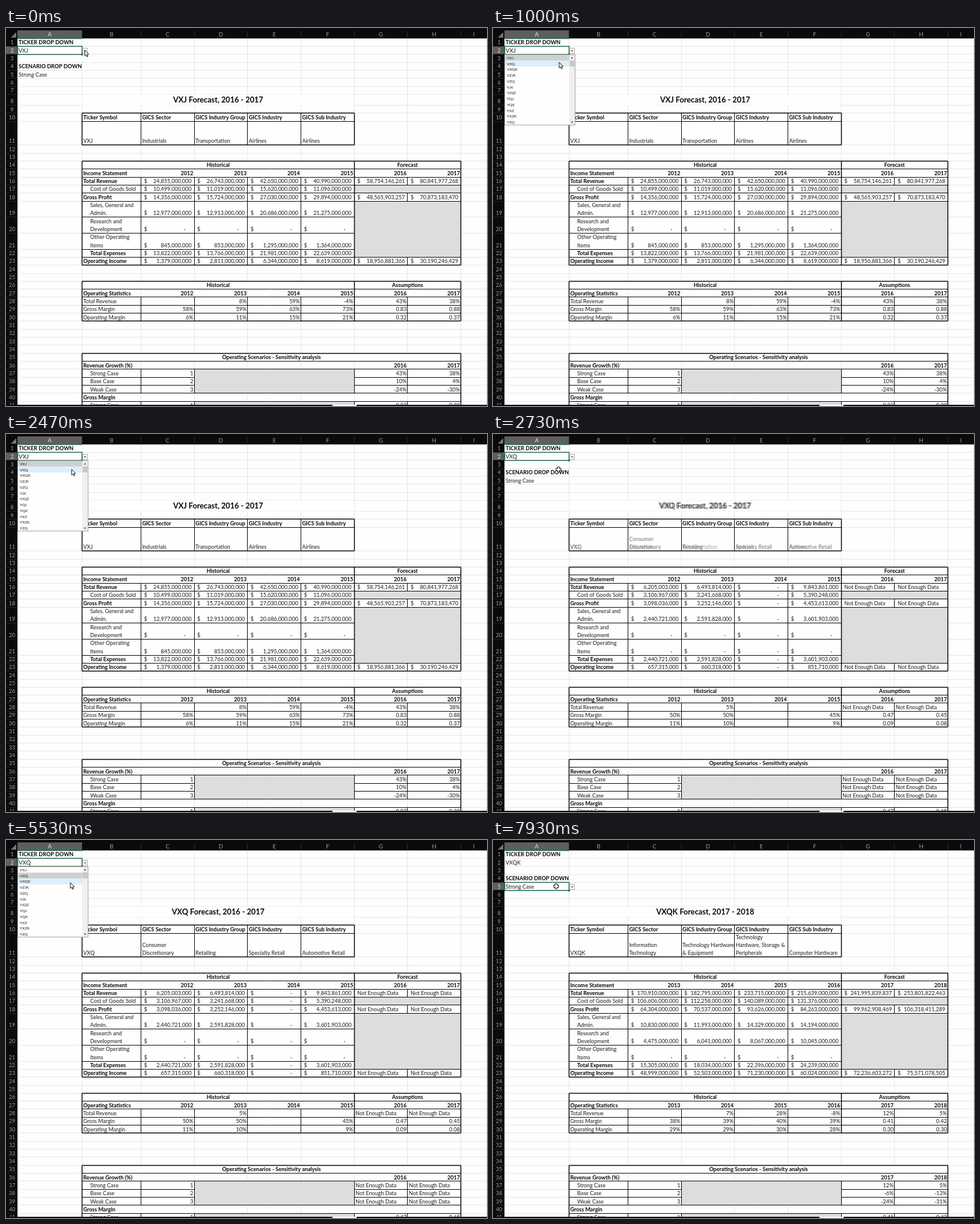
Recreate the animation shown at these times as an HTML page with a canvas. Size 800 by 629 pixels, loop 8000 ms.

```html
<!DOCTYPE html>
<html lang="en">
<head>
<meta charset="utf-8">
<title>Forecast sheet</title>
<style>
html, body { margin: 0; width: 100%; height: 100%; overflow: hidden; background: #fefeff; }
canvas { display: block; }
</style>
</head>
<body>
<canvas id="stage" width="800" height="629"></canvas>
<script>
const ctx = document.getElementById('stage').getContext('2d');
const LOOP = 8000, FADE = 150;
const PAPER = '#fefeff', SHADE = '#dddddd', GRID = '#e6e6ea', INK = '#080808', SOFT = '#1c1c1c';
const DARK = '#0a0a0a', LIT = '#5e5e5e', GREEN = '#236b47';

// Column edges A..I, and row edges where rowY[n] is the bottom of row n.
const LINE = 13.33;
const [A, B, C, D, E, F, G, H, I] = Array.from({ length: 9 }, (_, i) => i);
const colX = [19, 126.5, ...Array.from({ length: 7 }, (_, i) => 224.4 + 88.7 * i), 799.5];
const rowY = [17.3];
const rowLines = { 8: 1.35, 11: 2.96, 19: 2, 20: 2, 21: 2 };
for (let r = 1; r <= 41; r++) rowY[r] = rowY[r - 1] + LINE * (rowLines[r] || 1);
const lineY = (row, up = 0) => rowY[row] - 6.6 - up * LINE;

const tickers = 'VXJ VXQ VXQK VZJK VZQ YJX YJQZ YQJ YQX YXZ YXZK YZQ'.split(' ');

// Reported figures in millions, four years each; every other figure is derived.
const companies = [
  {
    year: 2012, sector: ['Industrials', 'Transportation', 'Airlines', 'Airlines'],
    revenue: [24855, 26743, 42650, 40990], goods: [10499, 11019, 15620, 11096],
    admin: [12977, 12913, 20686, 21275], research: [0, 0, 0, 0], other: [845, 853, 1295, 1364]
  },
  {
    year: 2012, sector: ['Consumer|Discretionary', 'Retailing', 'Specialty Retail', 'Automotive Retail'],
    revenue: [6205.003, 6493.814, 0, 9843.861], goods: [3106.967, 3241.668, 0, 5390.248],
    admin: [2440.721, 2591.828, 0, 3601.903], research: [0, 0, 0, 0], other: [0, 0, 0, 0]
  },
  {
    year: 2013, sector: ['Information|Technology', 'Technology Hardware|& Equipment', 'Technology|Hardware, Storage &|Peripherals', 'Computer Hardware'],
    revenue: [170910, 182795, 233715, 215639], goods: [106606, 112258, 140089, 131376],
    admin: [10830, 11993, 14329, 14194], research: [4475, 6041, 8067, 10045], other: [0, 0, 0, 0]
  }
];

// Linear trend for the next two years, shifted by `sign` standard deviations.
function project(values, sign = 1) {
  const points = values.map((y, x) => [x, y]).filter(p => isFinite(p[1]));
  const mean = i => points.reduce((sum, p) => sum + p[i], 0) / points.length;
  const mx = mean(0), my = mean(1);
  const spread = (i, j) => points.reduce((sum, p) => sum + (p[i] - [mx, my][i]) * (p[j] - [mx, my][j]), 0);
  const slope = spread(0, 1) / spread(0, 0), deviation = Math.sqrt(spread(1, 1) / (points.length - 1));
  return [0, 1].map(k => my + slope * (values.length + k - mx) + sign * deviation);
}

function analyse(co) {
  const { revenue, goods, admin, research, other } = co;
  const gross = revenue.map((v, i) => v - goods[i]);
  const expenses = admin.map((v, i) => v + research[i] + other[i]);
  const income = gross.map((v, i) => v - admin[i] - research[i]);
  const growth = revenue.slice(1).map((v, i) => v && revenue[i] ? v / revenue[i] - 1 : NaN);
  const grossMargin = gross.map((v, i) => v / revenue[i]);
  const incomeMargin = income.map((v, i) => v / revenue[i]);
  const cases = [1, 0, -1].map(sign => project(growth, sign));
  const [first, second] = cases[0];
  const sales = [revenue[3] * (1 + first), revenue[3] * (1 + first) * (1 + second)];
  const [grossNext, incomeNext] = [project(grossMargin), project(incomeMargin)];
  const share = rates => sales.map((v, i) => v * rates[i]);
  return {
    history: [revenue, goods, gross, admin, research, other, expenses, income],
    forecast: { 16: sales, 18: share(grossNext), 23: share(incomeNext) },
    growth, grossMargin, incomeMargin, cases, grossNext, incomeNext
  };
}
const results = companies.map(analyse);

function text(str, x, y, { align = 'left', bold = false, size = 9, color = bold ? INK : SOFT } = {}) {
  ctx.font = `${bold ? 'bold ' : ''}${size}px Lato, sans-serif`;
  ctx.textAlign = align;
  ctx.fillStyle = color;
  ctx.fillText(str, x, y + size * 0.36);
}
function rect(x, y, w, h, fill) {
  ctx.fillStyle = fill;
  ctx.fillRect(x, y, w, h);
}
function box(x, y, w, h, color, width = 1) {
  ctx.strokeStyle = color;
  ctx.lineWidth = width;
  ctx.strokeRect(x, y, w, h);
}
function line(x1, y1, x2, y2, width = 1, color = INK) {
  const snap = v => Math.floor(v) + 0.5;
  ctx.strokeStyle = color;
  ctx.lineWidth = width;
  ctx.beginPath();
  ctx.moveTo(snap(x1), snap(y1));
  ctx.lineTo(snap(x2), snap(y2));
  ctx.stroke();
}

// Block helpers take inclusive columns and rows.
const fillCells = (c1, r1, c2, r2, color) =>
  rect(colX[c1], rowY[r1 - 1], colX[c2 + 1] - colX[c1], rowY[r2] - rowY[r1 - 1], color);
const under = (row, c1, c2, width) => line(colX[c1], rowY[row], colX[c2 + 1], rowY[row], width);
const leftOf = (col, r1, r2, width) => line(colX[col], rowY[r1 - 1], colX[col], rowY[r2], width);
function frame(c1, r1, c2, r2) {
  under(r1 - 1, c1, c2, 1.5);
  under(r2, c1, c2, 1.5);
  leftOf(c1, r1, r2, 1.5);
  leftOf(c2 + 1, r1, r2, 1.5);
}

function label(str, col, row, bold, indent = 2) {
  const lines = str.split('|');
  lines.forEach((s, i) => text(s, colX[col] + indent, lineY(row, lines.length - 1 - i), { bold }));
}
const right = (str, col, row, bold, gap = 1.7) => text(str, colX[col + 1] - gap, lineY(row), { align: 'right', bold });
const centre = (str, c1, c2, row) => text(str, (colX[c1] + colX[c2 + 1]) / 2, lineY(row), { align: 'center', bold: true });
const noData = (col, row, indent) => label('Not Enough Data', col, row, false, indent);

function money(millions, col, row) {
  if (isNaN(millions)) return noData(col, row, 5);
  label('$', col, row, false, 5);
  if (millions) right(Math.round(millions * 1e6).toLocaleString('en-US'), col, row, false, 4.5);
  else right('-', col, row, false, 14.5);
}
const percent = v => Math.round(v * 100) + '%';
const decimal = v => v.toFixed(2);
const past = (values, col, row) => values.forEach((v, i) => isNaN(v) || right(percent(v), col + i, row));
const future = (values, row, format) =>
  values.forEach((v, i) => isNaN(v) ? noData(G + i, row) : right(format(v), G + i, row));

function drawGrid() {
  rect(0, 0, 800, 629, PAPER);
  colX.forEach(x => line(x, 17, x, 629, 1, GRID));
  rowY.forEach(y => line(19, y, 800, y, 1, GRID));
  [[B, 8, F, 8], [B, 14, F, 14], [G, 14, H, 14], [B, 26, F, 26], [G, 26, H, 26], [B, 35, H, 35]]
    .forEach(block => fillCells(...block, PAPER));
  [[G, 17, H, 17], [G, 19, H, 22], [D, 37, F, 39], [D, 41, F, 41]]
    .forEach(block => fillCells(...block, SHADE));
}

function drawBorders() {
  frame(B, 10, F, 11);
  under(10, B, F);
  for (let c = C; c <= F; c++) leftOf(c, 10, 11);

  frame(B, 14, H, 23);
  [14, 15].forEach(r => under(r, B, H));
  for (let r = 16; r < 23; r++) under(r, B, F);
  [16, 17, 18, 22].forEach(r => under(r, G, H));
  for (let c = C; c <= F; c++) leftOf(c, 16, 23);
  leftOf(G, 14, 23, 1.5);
  [16, 18, 23].forEach(r => leftOf(H, r, r));

  frame(B, 26, H, 30);
  for (let r = 26; r < 30; r++) under(r, B, H);
  for (let c = C; c <= H; c++) leftOf(c, 28, 30);
  leftOf(G, 26, 30, 1.5);

  frame(B, 35, H, 41);
  [35, 36, 39, 40].forEach(r => under(r, B, H));
  [37, 38].forEach(r => { under(r, B, C); under(r, G, H); });
  [C, D, G, H].forEach(c => { leftOf(c, 37, 39); leftOf(c, 41, 41); });
}

function drawLabels() {
  label('TICKER DROP DOWN', A, 1, true);
  label('SCENARIO DROP DOWN', A, 4, true);
  label('Strong Case', A, 5);
  ['Ticker Symbol', 'GICS Sector', 'GICS Industry Group', 'GICS Industry', 'GICS Sub Industry']
    .forEach((s, i) => label(s, B + i, 10, true));
  [14, 26].forEach(r => centre('Historical', B, F, r));
  centre('Forecast', G, H, 14);
  centre('Assumptions', G, H, 26);
  centre('Operating Scenarios - Sensitivity analysis', B, H, 35);

  const indent = 13.5;
  ['Income Statement', 'Total Revenue', '', 'Gross Profit'].forEach((s, i) => label(s, B, 15 + i, true));
  label('Cost of Goods Sold', B, 17, false, indent);
  ['Sales, General and|Admin.', 'Research and|Development', 'Other Operating|Items']
    .forEach((s, i) => label(s, B, 19 + i, false, indent));
  label('Total Expenses', B, 22, true, indent);
  label('Operating Income', B, 23, true);
  label('Operating Statistics', B, 27, true);
  ['Total Revenue', 'Gross Margin', 'Operating Margin'].forEach((s, i) => label(s, B, 28 + i));
  label('Revenue Growth (%)', B, 36, true);
  label('Gross Margin', B, 40, true);
  ['Strong Case', 'Base Case', 'Weak Case', '', 'Strong Case'].forEach((s, i) => {
    label(s, B, 37 + i, false, indent);
    if (s) right(String(i % 4 + 1), C, 37 + i);
  });
}

function drawHeading(index) {
  const { year, sector } = companies[index];
  text(`${tickers[index]} Forecast, ${year + 4} - ${year + 5}`, (colX[B] + colX[G]) / 2, 119,
    { align: 'center', bold: true, size: 12.7 });
  label(tickers[index], B, 11);
  sector.forEach((s, i) => label(s, C + i, 11));
}

function drawFigures(index) {
  const { year } = companies[index], r = results[index];
  for (let i = 0; i < 6; i++)
    for (const row of i < 4 ? [15, 27] : [15, 27, 36]) right(String(year + i), C + i, row, true);
  r.history.forEach((values, n) => values.forEach((v, i) => money(v, C + i, 16 + n)));
  Object.entries(r.forecast).forEach(([row, values]) => values.forEach((v, i) => money(v, G + i, +row)));
  past(r.growth, D, 28);
  past(r.grossMargin, C, 29);
  past(r.incomeMargin, C, 30);
  future(r.cases[0], 28, percent);
  future(r.grossNext, 29, decimal);
  future(r.incomeNext, 30, decimal);
  r.cases.forEach((values, i) => future(values, 37 + i, percent));
  future(r.grossNext, 41, decimal);
}

function drawHeaders(activeRow) {
  const grey = '#a0a0a0', bright = '#e4e4e4';
  rect(0, 0, 800, 17.3, DARK);
  rect(0, 0, 19, 629, DARK);
  rect(19, 4, 107.5, 13, LIT);
  rect(0, rowY[activeRow - 1], 18.5, LINE, LIT);
  line(19, 17, 126, 17, 1.5, GREEN);
  line(18, rowY[activeRow - 1], 18, rowY[activeRow], 1.5, GREEN);
  [...'ABCDEFGHI'].forEach((s, i) => {
    if (i) line(colX[i], 5, colX[i], 17, 1, '#2c2c2c');
    text(s, (colX[i] + colX[i + 1]) / 2, 10.8, { align: 'center', size: 9.5, color: i ? grey : bright });
  });
  for (let r = 1; r <= 41; r++) {
    line(0, rowY[r], 18, rowY[r], 1, '#242424');
    text(String(r), 10, lineY(r), { align: 'center', color: r === activeRow ? bright : grey });
  }
  polygon([[17, 7], [17, 16], [8, 16]], '#747474');
  rect(0, 627, 800, 2, DARK);
  rect(543, 627, 40, 2, PAPER);
}

function polygon(points, fill, stroke) {
  ctx.beginPath();
  points.forEach(([x, y]) => ctx.lineTo(x, y));
  ctx.closePath();
  ctx.fillStyle = fill;
  ctx.fill();
  if (!stroke) return;
  ctx.strokeStyle = stroke;
  ctx.lineWidth = 1;
  ctx.stroke();
}
const chevron = (x, y, dir) => polygon([[x - 2, y - dir], [x + 2, y - dir], [x, y + dir]], '#484848');

function drawSelection(row) {
  const top = Math.floor(rowY[row - 1]) + 0.5;
  box(19.5, top, 107, 13.5, GREEN, 1.5);
  rect(125, top + 12, 3, 3, GREEN);
  rect(127.5, top + 3, 8, 9, '#f4f4f4');
  box(127.5, top + 3, 8, 9, '#b4b4b4');
  chevron(131.5, top + 7.7, 1);
}

const list = { top: 44.5, pitch: 9.75, height: 117 };
function drawList(selected, hover) {
  const { top, pitch, height } = list;
  rect(19, top, 117.5, height, PAPER);
  rect(19.5, top + selected * pitch, 107.5, pitch, '#d0d0d0');
  if (hover >= 0) rect(19.5, top + hover * pitch, 107.5, pitch, '#dbeefb');
  tickers.forEach((s, i) => text(s, 23, top + (i + 0.5) * pitch + 0.3, { size: 6.4 }));
  rect(127, top, 9, height, '#efeff0');
  rect(127.5, 54, 8, 10, '#c8c8c8');
  chevron(131.5, 49.5, -1.3);
  chevron(131.5, 157, 1.3);
  box(19.5, top, 117, height, '#a6a6a6');
}

function drawArrow(x, y) {
  const shape = [[0, 0], [0, 9.5], [2.2, 7.6], [3.8, 11], [5.3, 10.3], [3.8, 7], [6.7, 7]];
  polygon(shape.map(([dx, dy]) => [x + dx, y + dy]), '#ffffff', '#181818');
}
function drawCross(x, y) {
  for (const [reach, width, color] of [[4.5, 4.6, '#101010'], [3.6, 2.4, '#ffffff']]) {
    rect(x - reach, y - width / 2, reach * 2, width, color);
    rect(x - width / 2, y - reach, width, reach * 2, color);
  }
}

// Each move eases the pointer to x, y between its start and end times.
const moves = [[450, 900, 110, 57], [1500, 2700, 109, 59], [3400, 3950, 130, 41], [4450, 5100, 107, 71], [6800, 7300, 105, 77]];
function pointer(t) {
  let x = 131, y = 37;
  for (const [start, end, toX, toY] of moves) {
    const p = Math.min(1, Math.max(0, (t - start) / (end - start))), ease = p * p * (3 - 2 * p);
    x += (toX - x) * ease;
    y += (toY - y) * ease;
  }
  return [x, y];
}

const opens = [480, 4450], picks = [2640, 6110], scenarioClick = 7250;

function draw(t) {
  const current = picks.filter(p => t >= p).length;
  const open = opens.some((start, i) => t >= start && t < picks[i]);
  const activeRow = t >= scenarioClick ? 5 : 2;
  const [x, y] = pointer(t);

  drawGrid();
  drawBorders();
  drawLabels();
  drawFigures(current);
  const fade = current ? Math.min(1, (t - picks[current - 1]) / FADE) : 1;
  if (fade < 1) {
    ctx.globalAlpha = 1 - fade;
    drawHeading(current - 1);
  }
  ctx.globalAlpha = fade;
  drawHeading(current);
  ctx.globalAlpha = 1;
  text(tickers[current], 21, lineY(2), { size: open ? 9.6 : 9 });
  drawHeaders(activeRow);
  drawSelection(activeRow);

  const overCell = x < 126;
  if (open) drawList(current, overCell ? Math.floor((y - list.top) / list.pitch) : -1);
  if (overCell && !open) drawCross(x, y);
  else drawArrow(x, y);
}

function tick(now) {
  draw(now % LOOP);
  requestAnimationFrame(tick);
}
requestAnimationFrame(tick);
</script>
</body>
</html>
```
